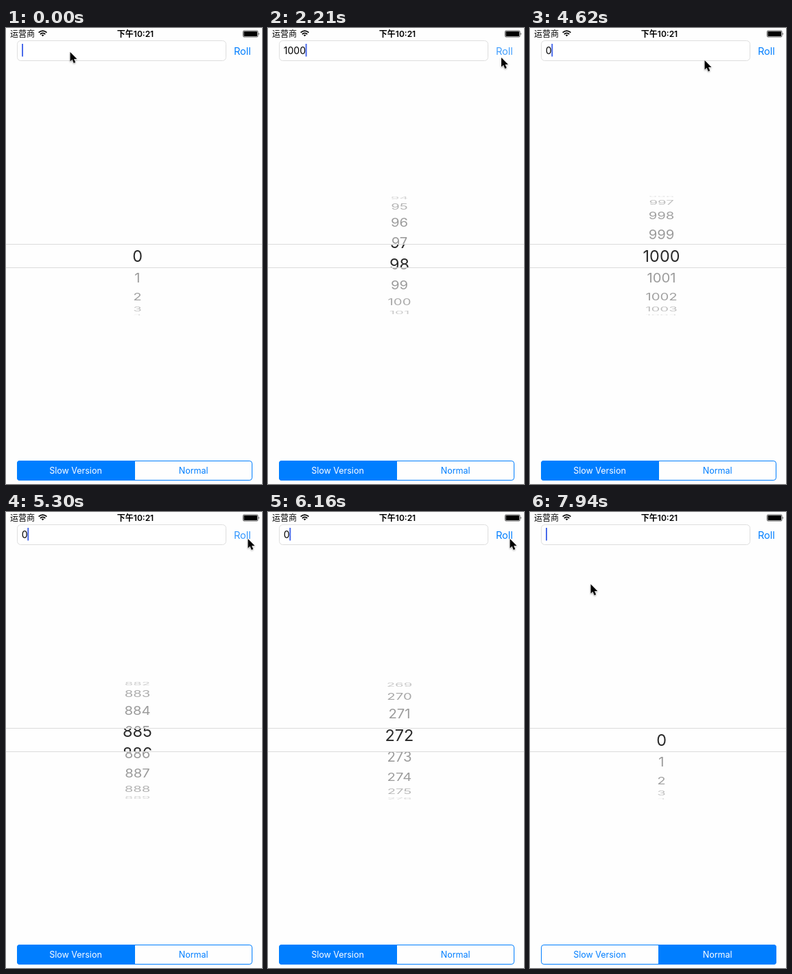
Animation, 373 px wide and 663 px high, one loop 8000 ms. Source, as an HTML page:

```html
<!DOCTYPE html>
<html lang="zh">
<head>
<meta charset="utf-8">
<style>
  html, body { margin: 0; width: 100%; height: 100%; overflow: hidden; background: #fefefe; }
  svg { display: block; width: 373px; height: 663px; font-family: Inter, Roboto, sans-serif; }
  .status { font: 12px "Noto Sans CJK SC", "Noto Sans CJK", "Noto Sans", sans-serif; }
  .clock { font: 600 12px Inter, "Noto Sans CJK SC", "Noto Sans CJK", sans-serif; }
  .mid { text-anchor: middle; }
  .seg { font-size: 12.5px; text-anchor: middle; }
</style>
</head>
<body>
<svg viewBox="0 0 373 663">
  <defs>
    <clipPath id="outside"><path d="M0 243H373V314H0ZM0 349H373V420H0Z"/></clipPath>
    <clipPath id="inside"><path d="M0 315H373V348H0Z"/></clipPath>
  </defs>

  <text class="status" x="6" y="12.6">运营商</text>
  <g fill="none" stroke="#000" stroke-width="1.7">
    <path d="M47.6 6.6Q53.5 1.6 59.4 6.6M49.8 9Q53.5 5.8 57.2 9"/>
    <path d="M51.6 10.2Q53.5 8.8 55.4 10.2L53.5 12.3Z" fill="#000" stroke="none"/>
  </g>
  <text class="clock mid" x="188.5" y="12.6">下午10:21</text>
  <rect x="345.5" y="4" width="21.5" height="9" rx="1.5" fill="none" stroke="#000" stroke-width=".7"/>
  <rect x="346.5" y="5" width="19.5" height="7" rx=".7"/>
  <path d="M368 6.7Q369.6 8.5 368 10.3Z"/>

  <rect x="16.5" y="18.5" width="304" height="29" rx="5" fill="#fff" stroke="#dedede"/>
  <text id="field" x="22.8" y="37.8" font-size="14"></text>
  <rect id="caret" y="23" width="2" height="18.5" fill="#4a6bea"/>
  <text id="roll" class="mid" x="344.4" y="38.6" font-size="14.6" fill="#007eff">Roll</text>

  <g id="wheel" class="mid" clip-path="url(#outside)" font-size="20.3"></g>
  <g id="lens" class="mid" clip-path="url(#inside)" font-size="23.4" fill="#2a2a2a"></g>
  <path d="M0 314.5H373M0 348.5H373" stroke="#dcdcdc"/>

  <path id="left" d="M188 629H20Q16 629 16 633V654Q16 658 20 658H188Z" fill="#007eff"/>
  <path id="right" d="M187.5 629H355Q359 629 359 633V654Q359 658 355 658H187.5Z" fill="#007eff"/>
  <rect x="16.5" y="629.5" width="342" height="28" rx="3.6" fill="none" stroke="#007eff"/>
  <path d="M187.5 629V658" stroke="#007eff"/>
  <text id="slow" class="seg" x="101.5" y="648">Slow Version</text>
  <text id="normal" class="seg" x="273.2" y="648">Normal</text>

  <path id="pointer" d="M0 0V13.6L3 10.8L5.2 16L7.7 15L5.5 10H9.8Z" stroke="#fff" stroke-width="1" paint-order="stroke"
        style="filter:drop-shadow(0 1px 1px rgba(0,0,0,.35))"/>
</svg>
<script>
const LOOP = 8000, ROWS = 1000;
const CENTER_X = 191.5, CENTER_Y = 331.7, RADIUS = 86, STEP = 0.375;
const ROLL_UP = 1973.5, ROLL_DOWN = 5022.2;
const CRUISE = 926.5, ROLL_TIME = 1336, SPEED = 0.41106;

// time, field text
const typing = [[-540, ''], [230, '1'], [400, '10'], [580, '100'], [690, '1000'],
  [3130, '100'], [3310, '10'], [3490, '1'], [3610, ''], [4140, '0'], [7940, '']];
// time, pointer x, pointer y
const path = [[0, 93.5, 35], [1290, 93.5, 35], [1800, 340, 43], [2250, 340, 43], [2900, 199.5, 34],
  [4619, 199.5, 34], [4620, 254.5, 47], [4960, 352.5, 39], [6300, 352.5, 39], [6850, 275.5, 643],
  [7190, 275.5, 643], [7700, 88.5, 105], [8000, 88.5, 105]];

const $ = id => document.getElementById(id);
const clamp = v => Math.min(1, Math.max(0, v));
const ramp = (t, a, b) => clamp((t - a) / (b - a));
const smooth = k => k * k * (3 - 2 * k);

function makeRows(group, count) {
  return Array.from({ length: count }, () =>
    group.appendChild(document.createElementNS('http://www.w3.org/2000/svg', 'text')));
}
const outer = makeRows($('wheel'), 10);
const inner = makeRows($('lens'), 4);

// Rows travelled: steady spin, then a burst that settles on the last row
function travelled(e) {
  if (e <= CRUISE) return Math.max(0, e) * SPEED;
  const span = ROLL_TIME - CRUISE, k = clamp((e - CRUISE) / span);
  const from = CRUISE * SPEED;
  return from + (ROWS - from) * smooth(k) + SPEED * span * k * (1 - k) ** 2;
}

function drawRows(rows, value, cap, flat) {
  const first = Math.floor(value) - rows.length / 2 + 1;
  rows.forEach((row, i) => {
    const n = first + i, angle = (n - value) * STEP, tilt = Math.cos(angle);
    if (n < 0 || tilt < 0.01) { row.textContent = ''; return; }
    row.textContent = n;
    const y = CENTER_Y + RADIUS * Math.sin(angle);
    row.setAttribute('transform', `translate(${CENTER_X} ${y}) scale(1 ${flat ? 1 : tilt})`);
    row.setAttribute('y', cap);
    if (!flat) row.setAttribute('opacity', 0.08 + 0.31 * Math.min(1, tilt * 1.25));
  });
}

function pointerAt(t) {
  const i = path.findIndex(p => p[0] > t), [t0, x0, y0] = path[i - 1], [t1, x1, y1] = path[i];
  const k = smooth(ramp(t, t0, t1));
  return [x0 + (x1 - x0) * k, y0 + (y1 - y0) * k];
}

function caretAlpha(age) {
  const phase = age % 1000;
  return Math.max(1 - ramp(phase, 590, 640), ramp(phase, 850, 1000));
}

function rollAlpha(t, release) {
  return t < release - 120 ? 1 : 0.3 + 0.7 * ramp(t, release, release + 380);
}

function draw(t) {
  const [since, text] = typing.filter(s => s[0] <= t).pop();
  $('field').textContent = text;
  $('caret').setAttribute('x', 23 + (text ? $('field').getComputedTextLength() - 0.6 : 0));
  $('caret').setAttribute('opacity', caretAlpha(t - since));
  $('roll').setAttribute('opacity', rollAlpha(t, t < 4000 ? ROLL_UP : ROLL_DOWN));

  const value = travelled(t - ROLL_UP) - travelled(t - ROLL_DOWN);
  drawRows(outer, value, 7.4, false);
  drawRows(inner, value, 8.5, true);

  const on = ramp(t, 7090, 7200);
  $('left').setAttribute('opacity', 1 - on);
  $('right').setAttribute('opacity', on);
  $('slow').setAttribute('fill', on < 0.5 ? '#fff' : '#007eff');
  $('normal').setAttribute('fill', on < 0.5 ? '#007eff' : '#fff');
  $('pointer').setAttribute('transform', `translate(${pointerAt(t)})`);
}

const start = performance.now();
function tick() {
  draw((performance.now() - start) % LOOP);
  requestAnimationFrame(tick);
}
tick();
</script>
</body>
</html>
```
